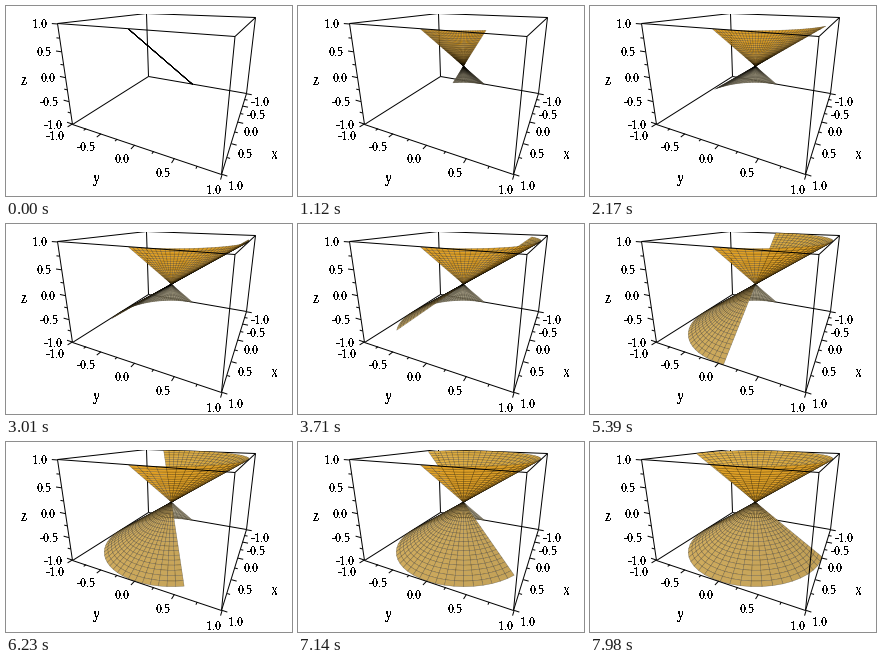
These frames come from a looping animation (286x190 px, 8000 ms). A matplotlib script:

```python
import numpy as np
import matplotlib.pyplot as plt
from matplotlib.animation import FuncAnimation
from matplotlib.collections import LineCollection, PolyCollection
from matplotlib.patches import Rectangle

plt.rcParams["text.hinting"] = "native"
plt.rcParams["text.hinting_factor"] = 1

W, H, DPI = 286, 190, 100
LOOP, INTERVAL = 8000, 20
STEP_MS, TICK_MS = 214.375, 70
STEPS_PER_TURN = 49
CELLS = 39
PX = 72 / DPI

GOLD, GOLD_INNER = (226, 162, 38), (219, 171, 66)
SAND, SAND_INNER = (203, 168, 92), (204, 190, 148)

# Screen positions of the box corners, keyed by (x, y, z)
CORNERS = {
    (1, -1, -1): (66, 118), (1, 1, -1): (215, 168),
    (-1, 1, -1): (240, 87), (-1, -1, -1): (142, 70),
    (1, -1, 1): (51, 17), (1, 1, 1): (228.5, 30),
    (-1, 1, 1): (249, 11), (-1, -1, 1): (140, 7),
}


def fit_camera():
    """Perspective matrix that best maps the box corners to the screen."""
    rows, values = [], []
    for (x, y, z), (u, v) in CORNERS.items():
        p = [x, y, z, 1]
        rows.append(p + [0] * 4 + [-u * c for c in p[:3]])
        rows.append([0] * 4 + p + [-v * c for c in p[:3]])
        values += [u, v]
    solution = np.linalg.lstsq(np.array(rows, float), np.array(values, float),
                               rcond=None)[0]
    return np.append(solution, 1).reshape(3, 4)


CAMERA = fit_camera()


def project(points):
    """Return screen positions and depths of an (..., 3) array."""
    points = np.asarray(points, float)
    q = points @ CAMERA[:, :3].T + CAMERA[:, 3]
    return q[..., :2] / q[..., 2:] + 0.5, q[..., 2]


fig = plt.figure(figsize=(W / DPI, H / DPI), dpi=DPI, facecolor="white")
ax = fig.add_axes([0, 0, 1, 1])
ax.set_xlim(0, W)
ax.set_ylim(H, 0)
ax.axis("off")


def draw_lines(segments, zorder):
    ax.add_collection(LineCollection(segments, colors="black",
                                     linewidths=PX, zorder=zorder))


def draw_text(x, y, text, size, ha="center"):
    ax.text(x, y, text, fontsize=size * PX, family="Liberation Serif",
            ha=ha, va="center_baseline", antialiased=False, zorder=6)


def draw_box():
    front, back = [], []
    for a in CORNERS:
        for axis in range(3):
            if a[axis] < 0:
                b = a[:axis] + (1,) + a[axis + 1:]
                hidden = (a[:2] == (-1, -1) or (axis == 0 and a[1] == -1)
                          or (axis == 1 and a[0] == -1)
                          or (axis == 2 and a[:2] == (-1, 1)))
                segment = np.array([CORNERS[a], CORNERS[b]]) + 0.5
                (back if hidden else front).append(segment)
    draw_lines(back, 1)
    draw_lines(front, 4)
    # The plot is cut off just above the far top corner
    ax.add_patch(Rectangle((0, 0), W, 7.6, color="white", lw=0, zorder=5))


def draw_axis(place, outward, label_offset, ha="center"):
    ticks = []
    for i, value in enumerate(np.linspace(-1, 1, 9)):
        base = np.array(place(value))
        start = project(base)[0]
        direction = project(base + 0.05 * np.array(outward))[0] - start
        direction /= np.hypot(*direction)
        ticks.append([start, start + direction * (3 if i % 2 else 5.5)])
        if i % 2 == 0:
            dx, dy = label_offset(value)
            draw_text(start[0] + dx, start[1] + dy, f"{value:.1f}", 13, ha)
    draw_lines(ticks, 4)


def cone(step):
    """Depth-sorted quads and colours of the swept double cone."""
    r = np.linspace(-1, 1, CELLS + 1)[:, None]
    angle = np.linspace(0, 2 * np.pi * step / STEPS_PER_TURN, CELLS + 1)
    mesh = np.stack(np.broadcast_arrays(r * np.cos(angle), r * np.sin(angle), r),
                    axis=-1)
    screen, depth = project(mesh)

    def cells(a):
        quads = np.stack([a[:-1, :-1], a[1:, :-1], a[1:, 1:], a[:-1, 1:]], axis=2)
        return quads.reshape(-1, *quads.shape[2:])

    quads, solid = cells(screen), cells(mesh).mean(axis=1)
    x, y = quads[..., 0], quads[..., 1]
    area = (x * np.roll(y, -1, axis=1) - y * np.roll(x, -1, axis=1)).sum(axis=1)
    inside, upper = (area < 0)[:, None], (solid[:, 2] > 0)[:, None]
    colours = np.where(upper, np.where(inside, GOLD_INNER, GOLD),
                       np.where(inside, SAND_INNER, SAND)) / 255
    radius = np.hypot(solid[:, 0], solid[:, 1]) + 1e-6
    glow = 1 - 0.04 * solid[:, 1] / radius
    colours = np.clip(colours * glow[:, None], 0, 1)
    order = np.argsort(-cells(depth).mean(axis=1), kind="stable")
    return quads[order], colours[order]


draw_box()
draw_axis(lambda v: (1, -1, v), (0, -1, 0), lambda v: (-10, 0), "right")
draw_axis(lambda v: (1, v, -1), (1, 0, 0), lambda v: (-13 + 4 * v, 13.5 + 2 * v))
draw_axis(lambda v: (v, 1, -1), (0, 1, 0), lambda v: (13.7, 9.5 + 1.5 * v))
draw_text(18, 73.5, "z", 16)
draw_text(90, 171, "y", 16)
draw_text(268.5, 147.5, "x", 16)

surface = PolyCollection([], edgecolors=(0, 0, 0, 0.36), linewidths=0.5 * PX,
                         zorder=3)
ax.add_collection(surface, autolim=False)

shapes = {}


def update(frame):
    # The picture advances in steps, on a coarse clock
    now = (frame * INTERVAL + INTERVAL - 1) // TICK_MS * TICK_MS
    step = int(now / STEP_MS)
    if step not in shapes:
        shapes[step] = cone(step)
    quads, colours = shapes[step]
    surface.set_verts(quads)
    surface.set_facecolor(colours)
    return (surface,)


animation = FuncAnimation(fig, update, frames=LOOP // INTERVAL,
                          interval=INTERVAL, repeat=True, repeat_delay=0)
plt.show()
```
